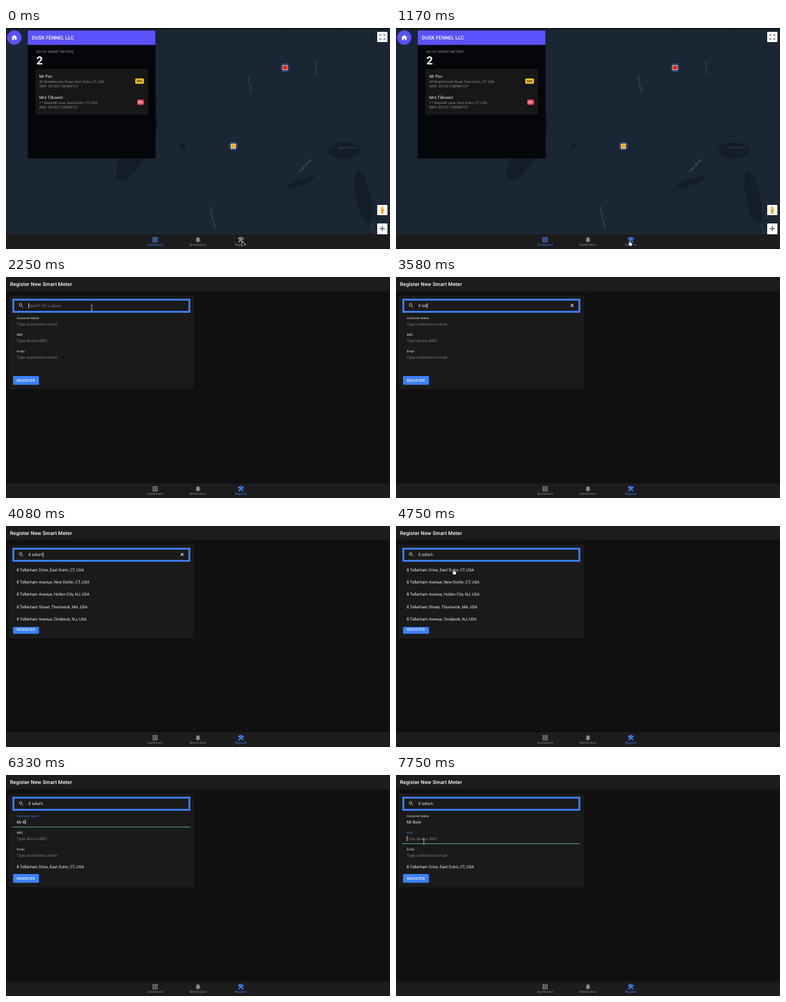
An HTML page with a canvas for the animation above (8 s loop, 600x346 px).

```html
<!DOCTYPE html>
<html lang="en">
<head>
<meta charset="utf-8">
<title>Smart meter registration</title>
<style>
html, body { margin: 0; width: 100%; height: 100%; overflow: hidden; background: #101010; }
canvas { display: block; width: 600px; height: 346px; }
</style>
</head>
<body>
<canvas id="stage"></canvas>
<script>
const W = 600, H = 346, LOOP = 8000;
const canvas = document.getElementById('stage');
const g = canvas.getContext('2d');
const scale = window.devicePixelRatio || 1;
canvas.width = W * scale;
canvas.height = H * scale;

const BLUE = '#3c80fa', GREY = '#8d8d8d', BAR = '#1c1c1c', PAGE = '#101010', CARD = '#1a1a1a';
const CORNERS = [0, 90, 180, 270];

// Key moments in ms
const HOVER = 80, OPEN = 1250, FOCUS = 2250, TYPING = 2670, LIST = 4080,
  PRESS = 4750, CHOSEN = 5000, NAME_FOCUS = 5500, NAME_KEYS = 5830, IMEI_FOCUS = 7750;

// ---------- helpers ----------
function box(x, y, w, h, fill, r = 0) {
  g.fillStyle = fill;
  g.beginPath();
  g.roundRect(x, y, w, h, r);
  g.fill();
}

function oval(x, y, rx, ry, fill, angle = 0) {
  g.fillStyle = fill;
  g.beginPath();
  g.ellipse(x, y, rx, ry, angle, 0, 2 * Math.PI);
  g.fill();
}

function line(color, width, ...pts) {
  g.strokeStyle = color;
  g.lineWidth = width;
  g.beginPath();
  for (const p of pts) g.lineTo(...p);
  g.stroke();
}

function area(color, ...pts) {
  g.fillStyle = color;
  g.beginPath();
  for (const p of pts) g.lineTo(...p);
  g.fill();
}

function text(str, x, y, size, color, { weight = 400, align = 'left', spacing = 0 } = {}) {
  g.font = `${weight} ${size}px Roboto, Arial, sans-serif`;
  g.textRendering = 'geometricPrecision';
  g.letterSpacing = spacing + 'px';
  g.textAlign = align;
  g.fillStyle = color;
  g.fillText(str, x, y);
  return g.measureText(str).width;
}

function at(x, y, draw, angle = 0) {
  g.save();
  g.translate(x, y);
  g.rotate(angle * Math.PI / 180);
  draw();
  g.restore();
}

function shadowed(blur, draw) {
  g.save();
  g.shadowColor = 'rgba(0,0,0,.4)';
  g.shadowBlur = blur * scale;
  draw();
  g.restore();
}

function seeded(seed) {
  return () => (seed = (seed * 16807) % 2147483647) / 2147483647;
}

// ---------- icons ----------
function gridIcon(color) {
  for (let i = 0; i < 9; i++) box(-4 + (i % 3) * 2.9, -4 + Math.floor(i / 3) * 2.9, 2.2, 2.2, color, 0.3);
}

function bellIcon(color) {
  box(-2.7, -3.8, 5.4, 5.6, color, [2.7, 2.7, 0, 0]);
  box(-3.7, 1.3, 7.4, 1.2, color, 0.6);
  oval(0, 3.2, 1.3, 1.1, color);
}

function toolsIcon(color) {
  g.lineCap = 'round';
  line(color, 1.9, [-3.2, 3.3], [2.2, -2]);
  line(color, 1.7, [-2, -1.8], [3.3, 3.4]);
  line(color, 2.2, [-3.5, -1.5], [-0.7, -3.6]);
  g.lineCap = 'butt';
  g.lineWidth = 1.4;
  g.beginPath();
  g.arc(2.6, -2.4, 1.5, 0, 4.7);
  g.stroke();
}

function homeIcon() {
  area('#fff', [-4.8, 0.3], [0, -4.2], [4.8, 0.3]);
  box(-3.4, 0, 2.4, 4, '#fff');
  box(1, 0, 2.4, 4, '#fff');
  box(-1, 0, 2, 1.2, '#fff');
}

// ---------- pointers, hot spot at 0,0 ----------
function arrow() {
  line('#eee', 1.4, [0, -3.5], [0, 2.8], [4.4, 1], [0, -3.5]);
  line('#111', 1.5, [1, 0], [2.9, 3.8]);
  area('#111', [0, -3.5], [0, 2.8], [4.4, 1]);
}

function hand() {
  for (const [color, grow] of [['#000', 0.6], ['#fff', 0]]) {
    box(-1 - grow, -3.2 - grow, 1.4 + 2 * grow, 5 + 2 * grow, color, 0.7);
    box(-2.4 - grow, -0.4 - grow, 5.4 + 2 * grow, 4.4 + 2 * grow, color, 1.4);
  }
}

function beam() {
  line('#c4c4c4', 0.8, [0, -4], [0, 4]);
  line('#c4c4c4', 0.8, [-1.4, -4], [1.4, -4]);
  line('#c4c4c4', 0.8, [-1.4, 4], [1.4, 4]);
}

// The pointer eases from one stop to the next; `hide` ends its visible stretch
const tabStop = [366, 337], searchStop = [134, 48], listStop = [91, 72], nameStop = [45, 75], imeiStop = [43.5, 104];
const moves = [
  { start: 0, end: 1000, from: [369, 338], to: tabStop, shape: hand, hide: 1670 },
  { start: 1670, end: 2000, from: tabStop, to: searchStop, shape: beam, hide: TYPING },
  { start: 4420, end: 4670, from: searchStop, to: listStop, shape: hand, hide: 5170 },
  { start: 5170, end: NAME_FOCUS, from: listStop, to: nameStop, shape: beam, hide: NAME_KEYS },
  { start: 7080, end: 7420, from: nameStop, to: imeiStop, shape: beam, hide: LOOP }
];

function drawPointer(t) {
  const m = moves.find(({ start, hide }) => t >= start && t < hide);
  if (!m) return;
  const k = Math.min(1, (t - m.start) / (m.end - m.start)), e = k * k * (3 - 2 * k);
  const [x, y] = m.from.map((v, i) => v + (m.to[i] - v) * e);
  at(x, y, t < HOVER ? arrow : m.shape);
}

// ---------- dashboard ----------
function drawMap() {
  const water = '#131d2b', label = '#47525d';
  box(0, 0, W, 324, '#1a2633');

  // Faint winding roads
  const rnd = seeded(41);
  for (let i = 0; i < 16; i++) {
    let x = 120 + rnd() * 480, y = rnd() * 320, dir = rnd() * 6.3;
    g.beginPath();
    g.moveTo(x, y);
    for (let s = 0; s < 14; s++) {
      dir += (rnd() - 0.5) * 0.8;
      g.lineTo(x += 10 * Math.cos(dir), y += 10 * Math.sin(dir));
    }
    g.strokeStyle = '#182430';
    g.lineWidth = 1;
    g.stroke();
  }

  oval(205, 188, 18, 58, water, 0.5);
  oval(277, 185, 4, 6, water);
  oval(528, 192, 24, 13, water);
  oval(460, 242, 24, 5, water, -0.35);
  oval(558, 264, 11, 42, water, -0.2);

  const name = (str, x, y, angle, color = label) =>
    at(x, y, () => text(str, 0, 1.6, 5, color, { align: 'center' }), angle);
  name('Tolver Brook', 381, 88, 80);
  name('Dorrin Br', 485, 63, 87);
  name('Tolver Brook', 467, 216, -48, '#646d76');
  name('Mollowquick Riv', 323, 297, 78);
  name('Hessel Cove', 533, 187, 0);
  name('Ullen R', 573, 314, 75);
}

function marker(x, y, color) {
  at(x, y, () => {
    for (const a of CORNERS) at(0, 0, () => line('#2f6fe0', 1, [-4.3, -5.7], [4.3, -5.7]), a);
    box(-5, -5, 10, 10, '#141c28');
    box(-4.1, -4.1, 8.2, 8.2, '#f4f4f4');
    box(-3.3, -3.3, 6.6, 6.6, color);
  });
}

function meterRow(y, name, address, imei, level, fill, ink, width) {
  text(name, 52, y, 6.5, '#f4f4f4');
  text(address, 52, y + 7.8, 5.6, '#8c8c8c');
  text('IMEI: ' + imei, 52, y + 15.4, 5.6, '#8c8c8c');
  box(215.5 - width, y + 1, width, 8.3, fill, 1.6);
  text(level, 215.5 - width / 2, y + 7, 5, ink, { weight: 700, align: 'center' });
}

function drawDashboard() {
  drawMap();
  box(0, 0, W, 1.5, '#0b0d10');
  marker(436, 62, '#f21d0d');
  marker(355.3, 185, '#f5a81c');

  // Map controls
  box(580, 6, 16, 16, '#fff', 1);
  box(580, 277, 16, 16, '#fff', 1);
  box(580, 306, 16, 17, '#fff', [1, 1, 0, 0]);
  for (const a of CORNERS)
    at(588, 14, () => line('#666', 1.3, [-3.6, -1.4], [-3.6, -3.6], [-1.4, -3.6]), a);
  box(585.4, 283, 5.2, 4.2, '#f3ae2b', 1.2);
  box(586.4, 286, 3.2, 4.8, '#e59b1c', 0.6);
  oval(588, 281.3, 2.1, 2.1, '#f8b834');
  line('#666', 1.6, [584, 314], [592, 314]);
  line('#666', 1.6, [588, 310], [588, 318]);

  oval(13, 15, 11.2, 11.2, '#5a50fa');
  at(13, 15, homeIcon);

  // Meter panel
  shadowed(2, () => box(34, 4, 199.5, 200, 'rgba(4,5,8,.9)', 1));
  box(34, 4, 199.5, 22.5, '#5a52fb', [1, 1, 0, 0]);
  text('DUSK FENNEL LLC', 40.3, 17.8, 7.85, '#fff', { weight: 500 });
  text('NO OF SMART METERS', 47.8, 38.6, 5.5, '#8f8f8f');
  text('2', 47.6, 56.8, 17.5, '#fff', { weight: 700 });
  box(46, 64, 176, 71.7, '#171717', 1.5);
  meterRow(78, 'Mr Pov', '30 Brattlewicks Road, East Dulm, CT, USA', '351521100980127',
    '50%', '#ffc72e', '#1a1400', 13.5);
  meterRow(111, 'Mrs Tillowen', '11 Dapwell Lane, East Dulm, CT, USA', '451521100980127',
    '0%', '#f4415c', '#fff', 10.5);
}

// ---------- registration ----------
const places = [
  'Drive, East Dulm, CT',
  'Avenue, New Dorlin, CT',
  'Avenue, Hollen City, NJ',
  'Street, Thornwick, MA',
  'Avenue, Orrabeck, NJ'
].map(p => `8 Tellerham ${p}, USA`);

// Letters typed since `start`, one per `gap` ms
const typed = (str, t, start, gap) => str.slice(0, Math.max(0, Math.floor((t - start) / gap) + 1));

function entry(value, hint, x, y, color) {
  if (value) return text(value, x, y, 6.35, color);
  text(hint, x, y, 6.35, '#787878');
  return 0;
}

const caret = (x, y) => box(x, y, 0.8, 8.2, '#e8e8e8');

function field(y, label, hint, value, focused, caretOn) {
  text(label, 16.7, y + 1.9, 4.8, focused ? '#3b7ce8' : '#e8e8e8');
  const width = entry(value, hint, 16.7, y + 11.7, '#f2f2f2');
  if (!focused) return;
  box(10, y + 17, 278, 0.9, '#61a872');
  if (caretOn) caret(16.7 + width, y + 5.3);
}

function drawSearch(t) {
  g.strokeStyle = '#3b7df0';
  g.lineWidth = 3;
  g.strokeRect(11.5, 35.5, 275, 19);

  g.strokeStyle = '#d0d0d0';
  g.lineWidth = 0.9;
  g.beginPath();
  g.arc(22.8, 43.7, 2.1, 0, 7);
  g.stroke();
  line('#d0d0d0', 0.9, [24.4, 45.3], [26.8, 47.7]);

  const query = typed('8 te', t, 2420, 250) + typed('llerh', t, 3420, 160);
  const width = entry(query, 'Search for a place', 35, 47, '#dedede');
  if (t >= FOCUS && t < PRESS - 170) caret(35 + width, 40.8);
  if (t >= TYPING && t < PRESS)
    for (const a of [45, 135]) at(275.2, 44.5, () => line('#e4e4e4', 1, [-3.1, 0], [3.1, 0]), a);
}

function drawRegister(t) {
  box(0, 0, W, H, PAGE);
  box(0, 0, W, 22.5, BAR);
  text('Register New Smart Meter', 6.2, 13.9, 8, '#fff', { weight: 500, spacing: 0.1 });
  shadowed(3, () => box(4, 29, 290, 147, CARD, 1.5));
  drawSearch(t);

  const onName = t >= NAME_FOCUS && t < IMEI_FOCUS;
  const name = typed('Mr ', t, NAME_KEYS, 85) + typed('Bont', t, 6250, 190);
  field(64, 'Customer Name', "Type customer's name", name, onName, t < 7580);
  field(90, 'IMEI', 'Type device IMEI', '', t >= IMEI_FOCUS, true);
  field(116, 'Email', "Type customer's email", '', false, false);
  if (t >= CHOSEN) text(places[0], 16.7, 145.8, 6.35, '#f2f2f2');
  box(11, 155, 40.5, 13.8, BLUE, 1.5);
  text('REGISTER', 17.1, 164, 5.6, '#fff', { weight: 500, spacing: 0.34 });

  if (t >= LIST && t < CHOSEN) {
    box(10, 58.5, 278, 99.5, CARD);
    places.forEach((p, i) => text(p, 16.7, 71 + i * 19.2, 6.35, '#f2f2f2'));
  }
}

function drawTabs(t) {
  box(0, 323, W, 23, BAR);
  if (t >= OPEN && t < 1670) {
    g.globalAlpha = Math.min(1, (1670 - t) / 250);
    box(340, 323, 54, 22.3, '#19263a', 1);
    g.globalAlpha = 1;
  }
  const tab = (x, name, icon, on) => {
    const color = on ? BLUE : GREY;
    at(x, 331.5, () => icon(color));
    text(name, x, 341.2, 4.8, color, { align: 'center', spacing: 0.14 });
  };
  tab(233, 'Dashboard', gridIcon, t < OPEN);
  tab(300, 'Notification', bellIcon, false);
  tab(367, 'Register', toolsIcon, t >= HOVER);
}

const origin = performance.now();
function tick() {
  const t = (performance.now() - origin) % LOOP;
  g.setTransform(scale, 0, 0, scale, 0, 0);
  if (t < OPEN) drawDashboard();
  else drawRegister(t);
  drawTabs(t);
  drawPointer(t);
  requestAnimationFrame(tick);
}
tick();
</script>
</body>
</html>
```
